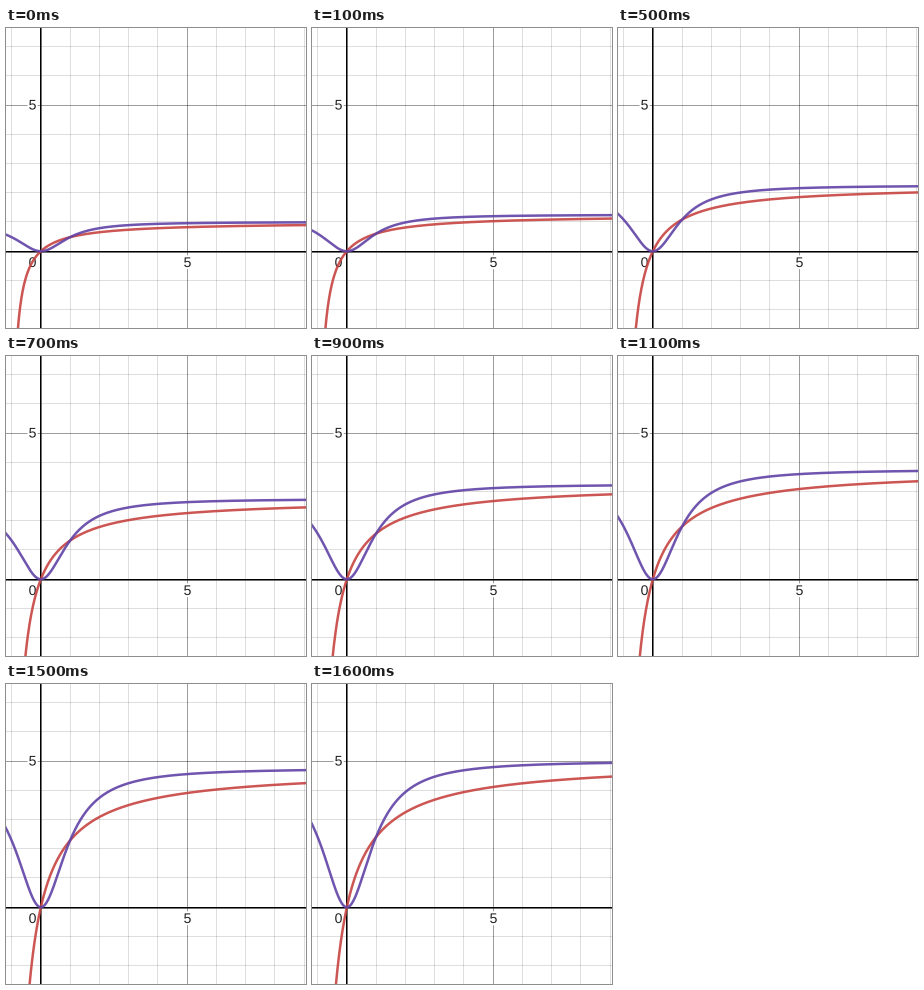
A matplotlib script that plays this animation: 300 px wide and 300 px high, repeating every 1700 ms.

```python
import math

import numpy as np
import matplotlib.pyplot as plt
from matplotlib.animation import FuncAnimation
from matplotlib.patheffects import withStroke

SIZE, DPI = 300, 100
UNIT = 29.24
OX, OY = 34.85, 223.22
HALF = 1.08          # shared constant in both denominators
STEPS, DELAY = 17, 100


def px(width):
    """Pixels to points."""
    return width * 72 / DPI


def to_screen(x, y):
    return OX + x * UNIT, OY - y * UNIT


def cross(k, alpha, width, z):
    """Vertical and horizontal line at k, starting on a whole pixel."""
    x, y = (math.floor(v) + width / 2 for v in to_screen(k, k))
    style = dict(color="black", alpha=alpha, lw=px(width), zorder=z,
                 snap=False, solid_capstyle="butt")
    ax.plot([x, x], [0, SIZE], **style)
    ax.plot([0, SIZE], [y, y], **style)


def label(text, x, y):
    ax.text(x, y, text, family="Liberation Sans", size=px(14), color="#222222",
            ha="center", va="center_baseline", zorder=4,
            path_effects=[withStroke(linewidth=px(4), foreground="white")])


def curve(color, z):
    return ax.plot([], [], color=color, lw=px(2.5), alpha=0.9, zorder=z,
                   snap=False, solid_joinstyle="round")[0]


fig = plt.figure(figsize=(SIZE / DPI, SIZE / DPI), dpi=DPI, facecolor="white")
ax = fig.add_axes([0, 0, 1, 1])
ax.set_xlim(0, SIZE)
ax.set_ylim(SIZE, 0)
ax.axis("off")

for k in range(-2, 10):
    if k == 0:
        cross(k, 1, 1.55, 3)
    elif k % 5 == 0:
        cross(k, 0.39, 1, 2)
    else:
        cross(k, 0.13, 1, 1)

label("0", 26.5, 233.5)
label("5", 26.5, OY - 5 * UNIT - 1)
label("5", OX + 5 * UNIT + 0.4, 233.5)

red = curve("#c74440", 5)
purple = curve("#6042a6", 6)

x_red = np.linspace(-0.95, 9.3, 1500)
x_purple = np.linspace(-1.4, 9.3, 800)


def update(i):
    a = 1 + 0.25 * i
    red.set_data(*to_screen(x_red, a * x_red / (x_red + HALF)))
    sq = x_purple ** 2
    purple.set_data(*to_screen(x_purple, a * sq / (sq + HALF)))
    return red, purple


anim = FuncAnimation(fig, update, frames=STEPS, interval=DELAY,
                     repeat=True, repeat_delay=0)
plt.show()
```
